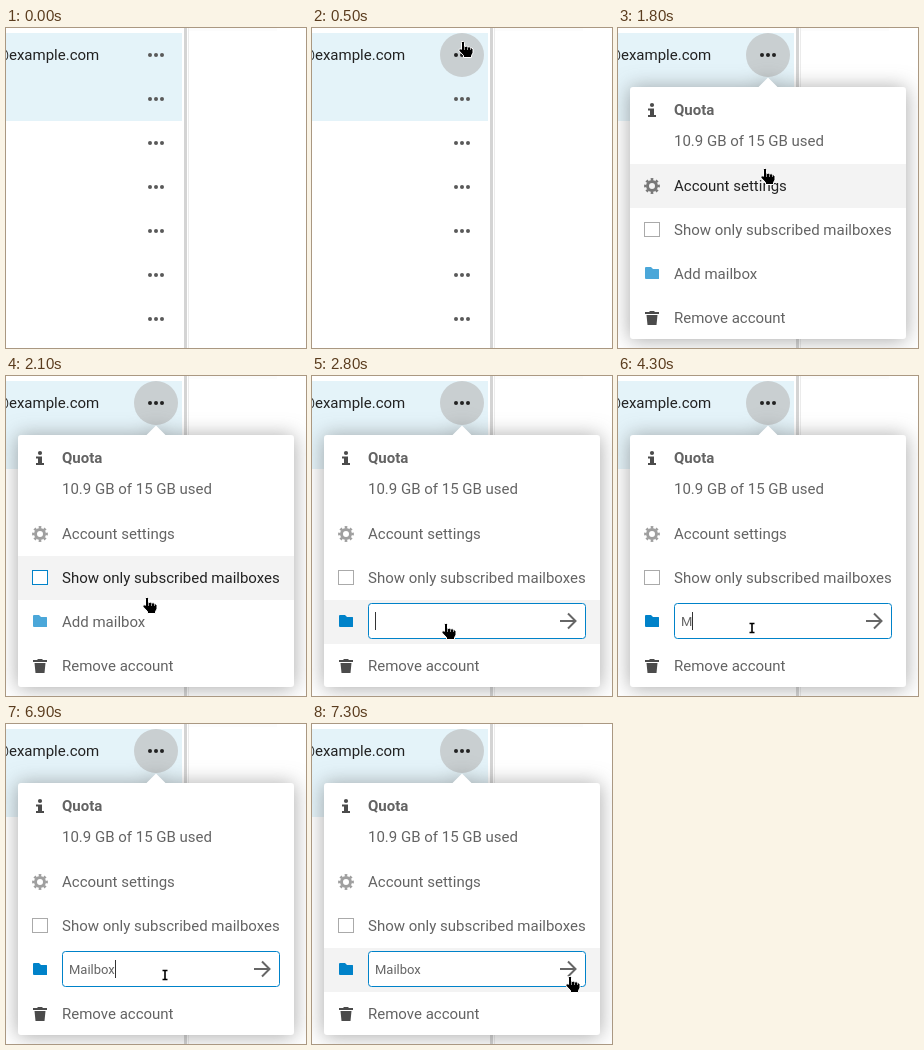
An HTML page that plays this animation: 300 by 320 pixels, repeating every 8 s.

```html
<!DOCTYPE html>
<html lang="en">
<head>
<meta charset="utf-8">
<title>Account menu</title>
<style>
  html, body { margin: 0; height: 100%; overflow: hidden; background: #fff; }
  svg { display: block; width: 100%; height: 100%; }
  text { font: 15px Roboto, sans-serif; fill: #222; }
  #menu { filter: drop-shadow(0 1px 10px rgba(77, 77, 77, .5)); }
  .item { opacity: .7; }
  .item.active { opacity: 1; }
  .active .box { stroke: #0082c9; }
  .box { fill: #fff; stroke: #878787; }
  .folder { fill: #0082c9; }
  #typed { font-size: 13px; fill: #646464; }
</style>
</head>
<body>
<svg viewBox="0 0 300 320">
  <rect y="5" width="176" height="88" fill="#e4f3f9"/>
  <rect x="183" width="88" height="3" fill="#fcfcfc"/>
  <rect x="178" width="3" height="320" fill="#d4d4d4"/>
  <rect x="182" width="1" height="320" fill="#ebebeb"/>
  <text x="93.2" y="32" text-anchor="end">@example.com</text>
  <circle id="halo" cx="150" cy="27" r="22" fill="#c9cfd1"/>
  <g id="dots"></g>

  <g id="menu">
    <path fill="#fff" d="M15 59H140.500L150 49.500L159.500 59H285a3 3 0 0 1 3 3V308a3 3 0 0 1-3 3H15a3 3 0 0 1-3-3V62a3 3 0 0 1 3-3Z"/>
    <rect id="highlight" x="12" width="276" height="44" fill="#f3f3f3"/>
    <g class="item">
      <circle cx="34" cy="77" r="2.100"/>
      <path d="M30 80.500h6v6.500h2v2h-8v-2h2v-4.500h-2z"/>
      <text x="56" y="87" font-weight="700" style="font-weight:700">Quota</text>
      <text x="56" y="118">10.9 GB of 15 GB used</text>
    </g>
    <g class="item" id="settings">
      <g fill="none" stroke="#777">
        <circle cx="34" cy="158" r="4.500" stroke-width="3"/>
        <circle cx="34" cy="158" r="6.700" stroke-width="2.400" pathLength="16" stroke-dasharray="1" stroke-dashoffset=".5"/>
      </g>
      <text x="56" y="163">Account settings</text>
    </g>
    <g class="item" id="subscribed">
      <rect class="box" x="26.500" y="194.500" width="15" height="14"/>
      <text x="56" y="207">Show only subscribed mailboxes</text>
    </g>
    <g class="item" id="add">
      <path class="folder" d="M28 239h5l2 2h5.500q.5 0 .5.500v9q0 .5-.5.500h-12.500q-1 0-1-1v-10q0-1 1-1z"/>
      <text id="addLabel" x="56" y="251">Add mailbox</text>
    </g>
    <g class="item">
      <path d="M31.500 283h5v1h4.500v2h-14v-2h4.500zM28.500 287h11l-1 10h-9z"/>
      <text x="56" y="295">Remove account</text>
    </g>
    <g id="field">
      <rect x="56.500" y="227.500" width="217" height="35" rx="3" fill="#fff" stroke="#0082c9"/>
      <path d="M248 245H263M256 237.500L263.500 245L256 252.500" fill="none" stroke="#666" stroke-width="2"/>
      <text id="typed" x="63" y="250"></text>
      <rect id="caret" y="236" width="1" height="18" fill="#333"/>
    </g>
  </g>

  <g id="hand" stroke="#fff">
    <path d="M-1.500 .5h2l1 1V5.500l2-.3 1.200.8 1.800-.2 1 1 1.500.2 1 1V12l-1.500 2.500v2h-8v-2l-4.500-4.700v-1.300l1-.8 1.500.6V1.500z"/>
    <path d="M1.500 6v3M4.500 6.500v2.500M7.500 7v2" stroke-width=".6"/>
  </g>
  <g id="beam" fill="none">
    <path d="M-3 -5H3M0 -5V5M-3 5H3" stroke="#fff" stroke-width="3"/>
    <path d="M-2.500 -4.500H2.500M0 -4.500V4.500M-2.500 4.500H2.500" stroke="#000" stroke-width="1.600"/>
  </g>
</svg>
<script>
const LOOP = 8000, STEP = 100;
const $ = id => document.getElementById(id);
const show = (id, on) => { $(id).style.display = on ? '' : 'none'; };
const within = (t, from, to) => t >= from && t < to;

// Pointer waypoints: time, x, y
const path = [
  [300, 3, -3], [400, 92, 3], [500, 151, 13], [1500, 151, 13],
  [1800, 147, 140], [2100, 141, 221], [2400, 134, 247], [2800, 134, 247],
  [2900, 134, 251], [3400, 134, 251], [3500, 134, 252], [6800, 134, 252],
  [7000, 184, 250], [7200, 250, 251], [7300, 258, 252], [LOOP, 258, 252]
];
const keyTimes = [4300, 4700, 4900, 5100, 5700, 5900, 6500];
const caretOff = [[3300, 3500], [4500, 4700], [5600, 5700], [7000, LOOP]];
const rowTop = { settings: 136, subscribed: 180, add: 224 };

$('dots').innerHTML = Array.from({ length: 21 }, (_, i) =>
  `<circle cx="${144 + i % 3 * 6}" cy="${27 + Math.floor(i / 3) * 44}" r="2" fill="#595959"/>`).join('');
const firstDots = [...$('dots').children].slice(0, 3);

function pointerAt(t) {
  const i = Math.max(1, path.findIndex(p => p[0] >= t));
  const [t0, x0, y0] = path[i - 1], [t1, x1, y1] = path[i];
  const k = Math.max(0, (t - t0) / (t1 - t0));
  return [x0 + (x1 - x0) * k, y0 + (y1 - y0) * k].map(Math.round);
}

function activeRow(t, y) {
  if (t >= 2200) return 'add';
  return y >= rowTop.subscribed ? 'subscribed' : 'settings';
}

function draw(now) {
  const t = Math.floor(now % LOOP / STEP) * STEP;
  const [x, y] = pointerAt(t);
  const editing = t >= 2700;
  const row = activeRow(t, y);
  const isBeam = within(t, 2900, 7100);

  show('halo', t >= 500);
  firstDots.forEach(dot => dot.setAttribute('fill', t >= 500 ? '#222' : '#595959'));
  show('menu', t >= 1300);
  for (const id in rowTop) $(id).classList.toggle('active', id === row);
  $('highlight').setAttribute('y', rowTop[row]);
  show('highlight', !within(t, 2900, 7100));

  show('addLabel', !editing);
  show('field', editing);
  $('typed').textContent = 'Mailbox'.slice(0, keyTimes.filter(k => k <= t).length);
  const textWidth = editing ? $('typed').getComputedTextLength() : 0;
  $('caret').setAttribute('x', 63 + Math.round(textWidth));
  show('caret', t >= 2800 && !caretOff.some(([from, to]) => within(t, from, to)));

  show('hand', t >= 300 && !isBeam);
  show('beam', isBeam);
  $(isBeam ? 'beam' : 'hand').setAttribute('transform', `translate(${x} ${y})`);
}

const start = performance.now();
function tick() {
  draw(performance.now() - start);
  requestAnimationFrame(tick);
}
tick();
</script>
</body>
</html>
```
